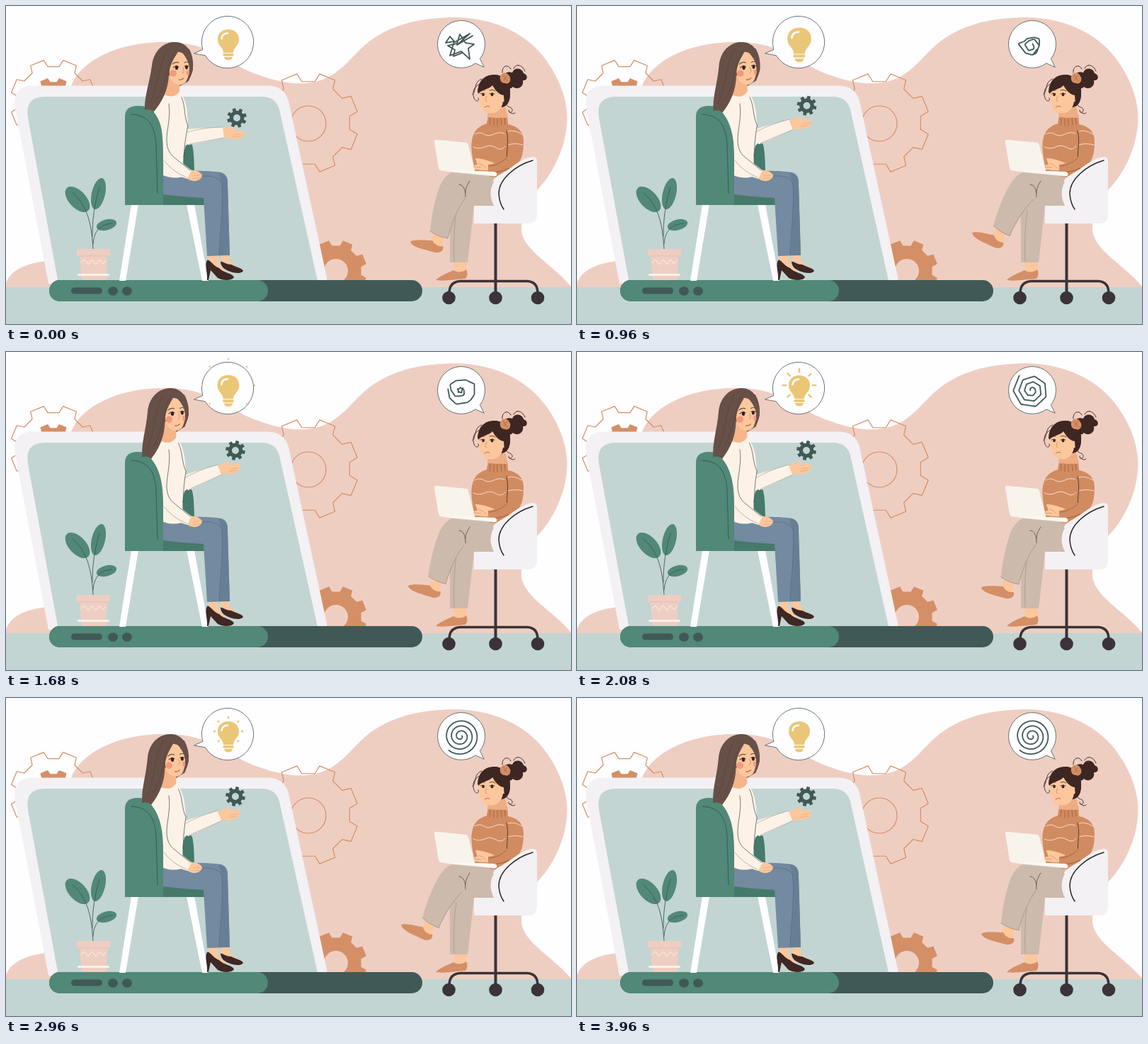
An HTML page with a canvas for the animation above (4 s loop, 798 by 449 pixels).

```html
<!DOCTYPE html>
<html lang="en">
<head>
<meta charset="utf-8">
<title>Online consultation</title>
<style>
html, body { margin: 0; width: 100%; height: 100%; overflow: hidden; background: #fefdff; }
canvas { display: block; width: 100vw; height: 100vh; }
</style>
</head>
<body>
<canvas id="stage"></canvas>
<script>
const W = 798, H = 449, LOOP = 4000;
const canvas = document.getElementById('stage');
const ctx = canvas.getContext('2d');
const dpr = window.devicePixelRatio || 1;
canvas.width = W * dpr;
canvas.height = H * dpr;

const C = {
  paper: '#fefdff', pink: '#efcec2', mint: '#c2d5d2', green: '#518877', dark: '#405956',
  orange: '#d48f66', rim: '#f3f1f4', cream: '#fdf2e7', skin: '#fcc79c', hair: '#675047',
  jeans: '#738aa0', shoe: '#3f2724', curl: '#3e2622', knit: '#d18b60', pants: '#ccbaac',
  metal: '#3a3337', bulb: '#ebc677', blush: '#f49a7c', ink: '#3d4a4c', shade: '#457969'
};

const clamp = v => Math.min(1, Math.max(0, v));
const mix = (a, b, u) => a + (b - a) * u;
const rad = d => d * Math.PI / 180;
const smooth = u => u * u * (3 - 2 * u);

function fill(d, color) {
  ctx.fillStyle = color;
  ctx.fill(d instanceof Path2D ? d : new Path2D(d), 'evenodd');
}
function line(d, color, w = 1) {
  ctx.strokeStyle = color;
  ctx.lineWidth = w;
  ctx.stroke(d instanceof Path2D ? d : new Path2D(d));
}
function oval(x, y, rx, ry = rx, turn = 0) {
  const p = new Path2D();
  p.ellipse(x, y, rx, ry, rad(turn), 0, Math.PI * 2);
  return p;
}
function pill(x, y, w, h, r) {
  const p = new Path2D();
  p.roundRect(x, y, w, h, r);
  return p;
}
function pivot(x, y, deg, draw, scale = 1) {
  ctx.save();
  ctx.translate(x, y);
  ctx.rotate(rad(deg));
  ctx.scale(scale, scale);
  ctx.translate(-x, -y);
  draw();
  ctx.restore();
}
function gear(x, y, outer, inner, turn, hole) {
  const p = new Path2D(), teeth = 8, step = 360 / teeth;
  const corners = [[-0.3, inner], [-0.21, outer], [0.21, outer], [0.3, inner]];
  for (let i = 0; i < teeth; i++) {
    for (const [k, r] of corners) {
      const a = rad(turn + (i + k) * step);
      p.lineTo(x + r * Math.cos(a), y + r * Math.sin(a));
    }
  }
  p.closePath();
  if (hole) p.addPath(oval(x, y, hole));
  return p;
}
// Round bubble whose tail fills the gap between two angles.
function bubble(x, y, r, from, to, tipX, tipY) {
  const p = new Path2D();
  p.arc(x, y, r, rad(to), rad(from + 360));
  p.lineTo(tipX, tipY);
  p.closePath();
  fill(p, C.paper);
  line(p, C.dark, 0.8);
}

// Thought line: a scribble that untangles into a spiral.
const points = s => s.split(' ').map(q => q.split(',').map(Number));
function spiral(start, turns, perTurn, r0, r1) {
  const n = Math.round(turns * perTurn);
  return Array.from({ length: n + 1 }, (_, i) => {
    const a = rad(start - 360 * i / perTurn), r = mix(r0, r1, i / n);
    return [642 + r * Math.cos(a), 54 + r * Math.sin(a)];
  });
}
const thoughts = [
  [0, points('659,42 637,55 655,39 634,51 627,43 621,52 633,50 627,70 643,64 655,75 653,60 661,54 649,52 641,40 637,53 624,56 634,62 632,71 645,66')],
  [640, points('661,69 659,51 655,43 645,34 634,42 624,48 627,58 621,68 638,74 650,73 655,62 653,50 643,45 634,53 633,63 643,67 649,60 644,54 638,58')],
  [1320, points('624,69 643,76 660,63 662,46 643,42 627,36 624,58 640,70 653,62 650,45 633,44 631,60 645,64 650,48')],
  [2080, spiral(230, 3.15, 7, 27, 2)],
  [2960, spiral(130, 3.4, 30, 26, 2)]
];
function along(poly, u) {
  const f = u * (poly.length - 1), i = Math.min(poly.length - 2, Math.floor(f));
  return [0, 1].map(k => mix(poly[i][k], poly[i + 1][k], f - i));
}
function thoughtPath(t) {
  let i = 0;
  while (i < thoughts.length - 2 && t >= thoughts[i + 1][0]) i++;
  const [t0, a] = thoughts[i], [t1, b] = thoughts[i + 1];
  const u = smooth(clamp((t - t0) / (t1 - t0)));
  const p = new Path2D(), n = 252;
  for (let k = 0; k <= n; k++) {
    const s = along(a, k / n), e = along(b, k / n);
    p.lineTo(mix(s[0], e[0], u), mix(s[1], e[1], u));
  }
  return p;
}

function backdrop() {
  ctx.fillStyle = C.paper;
  ctx.fillRect(0, 0, W, H);
  fill('M0,400 V391 C8,370 34,361 70,359 L92,113 C106,76 160,51 222,51 C290,50 308,80 356,97 C394,111 428,115 458,99 C492,79 498,49 552,29 C576,20 600,17 630,16 C690,15 740,42 764,78 C785,108 795,140 792,168 C789,205 770,240 750,260 C734,280 727,297 728,317 C731,345 772,365 798,396 V400Z', C.pink);
  ctx.fillStyle = C.mint;
  ctx.fillRect(0, 397, W, 52);

  line(gear(67, 136, 61, 51, -67.5), C.orange, 1.2);
  fill(gear(67, 136, 35, 29, -67.5), C.orange);
  line(gear(427, 165, 71, 59, -67.5), C.orange, 1.2);
  line(oval(427, 166, 25), C.orange, 1.2);
  fill(gear(466, 374, 44, 36, -67.5, 17), C.orange);
}

function laptop() {
  fill('M37,112.5 H370 Q393,113 399,134 L455,392 H60 L13,145 Q8,113 37,112.5Z', C.rim);
  fill('M55,128 H361 Q381,128 386,146 L441,392 H74 L31,158 Q26,128 55,128Z', C.mint);
  fill(pill(61, 387, 527, 30, 15), C.dark);
  fill(pill(61, 387, 309, 30, 15), C.green);
  fill(pill(92, 397.5, 44, 9, 4.5), C.dark);
  fill(oval(151, 402.5, 7, 6.3), C.dark);
  fill(oval(171, 402.5, 7, 6.3), C.dark);
}

function plant() {
  fill(oval(101, 273, 22, 12, 47), C.green);
  fill(oval(130.5, 265, 22.5, 9.5, -77), C.green);
  fill(oval(142, 309, 14.5, 7.5, -15), C.green);
  line('M123,343 C121,315 118,284 94,264 M122,325 C122,293 127,274 132,256 M123,336 C124,318 133,308 150,307', C.dark, 0.9);
  fill('M100,343 H147 V353 H143 L142,378 H106 L104,353 H100Z', C.pink);
  fill('M106,381 H143 L141,387 H108Z', C.pink);
  fill(pill(101, 378, 45, 3, 1.5), C.cream);
  line('M104,353 H143', '#dfb4a6', 0.7);
  line('M106,362 l5,-4 5,7 6,-7 5,7 5,-7 5,6 4,-5', C.cream, 1);
}

function leftChair() {
  fill('M177,280 H187 L169,388 H160Z M255,280 H266 L286,388 H277Z', C.paper);
  fill('M248,194 H262 Q266,200 266,245 H248Z', C.shade);
  fill('M168,281 V155 Q169,141 186,141 C209,141 221,153 222,190 V281Z', C.green);
  fill('M222,264 H281 V281 H222Z', C.shade);
  line('M177,153 C199,154 210,166 212,195 L214,264', '#33594e', 0.9);
}

function leftLegs() {
  fill('M286,350 H298 L300,364 L312,374 L287,372Z M303,348 H315 L316,360 L326,369 L304,365Z', C.skin);
  fill('M303,361 C306,360 309,365 318,365 C325,369 334,370 335,374 C332,379 321,377 314,374 C308,371 304,369 303,361Z', C.shoe);
  fill('M284,359 C288,357 292,367 301,370 C307,377 320,377 322,383 C319,388 307,388 299,384 L289,373 L286,387 H284 C285,376 280,366 284,359Z', C.shoe);
  fill('M222,238 C246,231 286,232 304,235 Q314,238 313,252 L316,352 L284,353 L279,271 C258,270 238,268 222,266Z', C.jeans);
  fill('M300,235 Q314,237 313,252 L316,352 H301 C303,320 307,285 305,252Z', '#677f95');
  line('M252,242 C276,240 300,236 305,251 C307,290 302,320 301,351', '#526a82', 0.7);
}

function leftHead(closed) {
  fill('M212,84 C215,60 226,51 238,51 C256,51 264,64 264,90 L258,106 L212,132Z', C.hair);
  fill('M228,98 H246 L245,121 C238,130 230,128 223,125Z', '#f5b58a');
  fill('M232,72 C237,61 251,63 258,76 C260,88 259,99 254,107 C248,114 241,111 235,107 C230,100 229,86 232,72Z', C.skin);
  fill(oval(236, 95, 4.8), C.blush);
  fill(oval(257, 94, 2, 3.8), C.blush);
  if (closed) {
    line('M236,88 Q240,91 244,88 M252,87 Q255,90 258,87', C.shoe, 1.2);
  } else {
    fill(oval(241, 87, 2.2, 2.9), '#33211f');
    fill(oval(255, 86.5, 2, 2.7), '#33211f');
    line('M236,87 Q240,83 244,86 M252,85 Q255,83 258,85', C.shoe, 1);
  }
  line('M235,82 Q239,78 244,80 M252,80 Q255,78 258,80', C.hair, 1.1);
  line('M250,87 Q253,94 249,95', '#d68c68', 0.9);
  line('M244,104 Q248,105 251,102', '#b95b4c', 1.2);
  fill('M247,56 C241,72 232,76 230,98 C229,119 220,136 209,149 Q202,144 196,147 C195,128 203,108 206,84 C209,61 224,51 238,51 Q247,51 247,56Z', C.hair);
  fill('M243,54 C249,69 258,74 259,87 C262,94 260,101 256,107 C267,94 266,75 259,61Z', C.hair);
  line('M241,61 C225,82 230,105 213,132 M229,60 C215,83 216,111 203,137', '#584139', 0.6);
}

function hand() {
  fill('M304,172 C314,173 319,168 325,172 L323,175 C329,177 336,175 338,178 C338,180 334,181 334,182 C337,183 334,188 328,188 C317,189 311,185 304,186Z', C.skin);
  line('M322,181 L333,182 M320,184 L331,185', '#e3a078', 0.6);
}

function leftBody(p, closed) {
  pivot(238, 238, -2.3 * p, () => {
    pivot(258, 187, -11.5 * p, () => {
      hand();
      fill('M246,175 C263,173 286,172 306,171 L308,186 C288,190 272,194 257,196Z', C.cream);
      line('M253,179 Q279,171 306,171 M308,186 C288,190 274,192 259,195', '#8e8580', 0.5);
    });
    fill('M222,124 Q233,131 245,120 C255,132 258,151 256,179 C260,187 259,195 254,197 C250,207 249,224 252,240 C242,244 231,243 222,239 C224,206 226,172 209,150 C207,137 214,128 222,124Z', C.cream);
    leftHead(closed);
    line('M248,129 C254,143 251,156 257,169 C253,187 252,202 251,213', C.ink, 0.7);
  });
  fill('M256,233 C264,230 274,233 277,239 C276,246 267,249 260,246 L253,242Z', C.skin);
  fill('M213,152 C220,142 231,146 231,160 C229,181 225,194 230,207 L262,232 L256,244 C240,240 226,231 222,220 C222,195 222,170 213,152Z', C.cream);
  line('M230,138 C233,157 227,174 227,189 C227,201 231,209 238,214 L260,232', C.ink, 0.7);
  line('M223,218 Q235,234 255,242', '#8e8580', 0.6);
  line('M264,240 L275,239 M264,244 L273,243', '#e3a078', 0.6);
}

function floatingGear(p) {
  const x = mix(326, 324, p) + 4 * p * (1 - p), y = mix(158, 139, p);
  fill(gear(x, y, 14, 10.3, 27 - 15 * p, 5), C.dark);
}

function ideaBubble(t) {
  bubble(313, 51, 36.7, 149, 164, 266, 67);
  const grow = t < 2000 ? (1 - Math.cos(Math.PI * t / 1000)) / 2 : 0;
  pivot(314, 54, 0, () => {
    fill('M307,66 C307,58 299,57 299,47 C299,38 306,33 314,33 C322,33 329,38 329,47 C329,57 321,58 321,66Z', C.bulb);
    fill(pill(306.5, 67, 15, 3.8, 1.6), C.bulb);
    fill('M308,72 H320 Q319,76.5 314,76.5 Q309,76.5 308,72Z', C.bulb);
    line('M304.5,46 Q305,39 313,38.5', C.paper, 2.6);
  }, 1 + 0.12 * grow);

  if (t >= 3840) return;
  const age = t % 960;
  const head = 18 + 20 * clamp(age / 520), tail = 18 + 20 * clamp((age - 360) / 400);
  if (head - tail < 0.2) return;
  const rays = new Path2D();
  for (let a = -225; a <= 45; a += 45) {
    const c = Math.cos(rad(a)), s = Math.sin(rad(a));
    rays.moveTo(314 + tail * c, 47 + tail * s);
    rays.lineTo(314 + head * c, 47 + head * s);
  }
  ctx.lineCap = 'butt';
  line(rays, C.bulb, 2.4);
  ctx.lineCap = 'round';
}

function thoughtBubble(t) {
  bubble(643, 54, 33.5, 38, 54, 675, 86);
  line(thoughtPath(t), C.dark, 1.8);
}

function rightHead() {
  fill('M702,108 C699,97 707,91 715,94 C718,86 729,87 731,95 C738,97 737,106 730,105 C732,115 721,119 716,114 C711,120 704,115 702,108Z', C.curl);
  line('M701,94 C700,85 709,81 713,89 M717,88 C721,80 730,84 733,92', C.curl, 1);
  fill('M666,122 C667,105 676,97 690,97 C705,98 713,110 712,125 C712,137 706,143 699,143Z', C.curl);
  fill('M681,143 H706 L708,158 L680,157Z', '#eeae84');
  fill('M668,119 C677,109 692,108 701,121 Q709,122 707,131 Q705,136 702,135 C700,148 691,153 681,151 C670,148 667,134 668,119Z', C.skin);
  fill('M667,124 C669,105 680,97 691,97 C706,98 713,111 712,125 C711,135 708,139 704,141 L703,126 C696,125 691,119 687,112 C682,118 673,117 667,124Z', C.curl);
  fill('M698,99 C702,92 709,94 711,99 C715,104 710,112 705,109 C699,109 697,104 698,99Z', C.orange);
  line('M702,97 L708,106 M708,98 L703,105', '#a9633f', 0.7);
  fill(oval(674, 125, 1.8, 2.3), C.curl);
  fill(oval(686.5, 125, 2, 2.4), C.curl);
  line('M670,124 Q673,122 676,124 M683,124 Q687,122 690,124', C.curl, 0.8);
  line('M670,120 Q673,118 676,119 M683,119 Q687,117 691,120', C.curl, 0.8);
  line('M679,127 Q675,134 679,135', '#d28a66', 0.8);
  line('M676,143 Q679,140 683,142', '#b95b4c', 0.9);
  line('M669,110 C661,114 658,121 661,130 C664,137 669,134 667,130 M672,103 C660,107 665,119 659,125 M706,137 C708,145 713,141 715,146 C716,151 709,152 710,147 M711,149 Q715,154 719,151', C.curl, 0.9);
}

function officeChair() {
  line('M691.5,306 V406', C.metal, 4);
  line('M626,406 Q626,389 642,388.5 H736 Q751,389 751,406', C.metal, 3.4);
  for (const x of [625.5, 691.5, 751]) fill(oval(x, 412, 9.3), C.metal);
  fill('M744,213 C734,213 722,222 712,229 C702,237 687,240 685,254 C683,264 685,275 689,281 L661,282 V307 H738 Q750,307 750,294 V219 Q750,213 744,213Z', C.rim);
  line('M744,218 C720,225 696,244 696,265 Q697,279 703,287', '#2e2424', 1.5);
}

function rightBody() {
  fill('M681,155 Q694,161 708,153 L709,167 C724,170 731,178 731,191 C731,206 729,216 722,224 L698,242 H664 C661,219 652,196 662,178 C667,170 674,168 679,166Z', C.knit);
  line('M684,158 L683,168 M689,159 V169 M694,159 V169 M699,158 L700,168 M704,156 L705,167', '#965633', 0.7);
  line('M662,181 Q669,177 675,181 T689,181 T704,180 M709,177 Q717,174 729,181 M660,199 Q668,203 676,199 T692,200 T705,198 M709,196 Q719,193 730,196', '#f4dccb', 1);
  line('M707,176 C711,192 706,207 708,216 C700,222 691,225 685,229', C.curl, 0.8);
}

function rightLap(swing) {
  fill('M632,358 H650 L651,379 L633,377Z', C.skin);
  fill('M607,387 C614,380 624,377 632,373 C638,377 646,376 650,372 C653,378 651,384 648,385 C635,386 620,389 607,387Z', C.orange);
  fill('M643,246 L689,248 C682,261 684,272 689,282 H661 C658,308 655,337 652,362 L627,362 C627,330 627,303 626,282Z', C.pants);
  line('M633,360 C632,333 633,309 636,289', '#a49387', 0.7);
  pivot(638, 252, 10 * swing, () => {
    fill('M604,320 L620,325 C615,333 616,340 618,344 L605,343 L600,333Z', C.skin);
    fill('M571,333 C576,329 594,331 602,331 C605,337 611,340 617,339 C619,346 613,349 606,348 C592,344 574,341 571,333Z', C.orange);
    fill('M611,259 C617,241 630,229 648,232 C663,236 661,258 649,271 C638,288 630,306 624,328 Q610,326 599,318 C601,296 605,277 611,259Z', C.pants);
    line('M624,328 Q611,326 599,318 M624,328 C630,303 638,287 648,272', '#a49387', 0.8);
  });
  fill('M621,242 C634,228 653,231 665,234 L690,243 Q684,253 684,264 L655,267 L640,258Z', C.pants);
  line('M640,252 Q647,252 649,264 M655,247 Q647,258 649,270', '#5b4c45', 0.8);
}

function notebook() {
  fill('M663,215 C671,215 684,219 692,223 L684,232 C675,232 666,231 658,230 L657,226 L666,224Z', C.skin);
  line('M668,222 Q674,224 678,229 M660,227 L671,228', '#cf8f68', 0.7);
  fill('M709,212 C699,220 690,223 681,224 L681,235 C692,236 703,233 712,228 L724,219Z', C.knit);
  line('M707,215 C699,222 689,226 682,226 M684,235 Q699,235 710,229', '#965633', 0.7);
  fill('M607,189 L649,193 Q652,193 653,197 L662,233 L633,235 L614,232 Q612,232 611,228 L605,191 Q605,189 607,189Z', '#f8f4ec');
  fill('M632,232 L690,234 Q694,235 693,239 Q692,241 686,240 L633,235Z', '#fcf8f2');
  line('M633,235 L688,240', '#d9cdc1', 0.6);
}

function draw(t) {
  ctx.setTransform(dpr, 0, 0, dpr, 0, 0);
  ctx.lineCap = ctx.lineJoin = 'round';
  const lift = smooth(clamp(t / 1180));
  const swing = (1 - Math.cos(Math.PI * t / 1000)) / 2;
  const blink = t >= 220 && (t - 220) % 1080 < 120;

  backdrop();
  laptop();
  plant();
  leftChair();
  leftLegs();
  leftBody(lift, blink);
  floatingGear(lift);
  ideaBubble(t);
  thoughtBubble(t);
  rightBody();
  rightHead();
  notebook();
  officeChair();
  rightLap(swing);
  notebook();
}

const began = performance.now();
function tick() {
  draw((performance.now() - began) % LOOP);
  requestAnimationFrame(tick);
}
tick();
</script>
</body>
</html>
```
